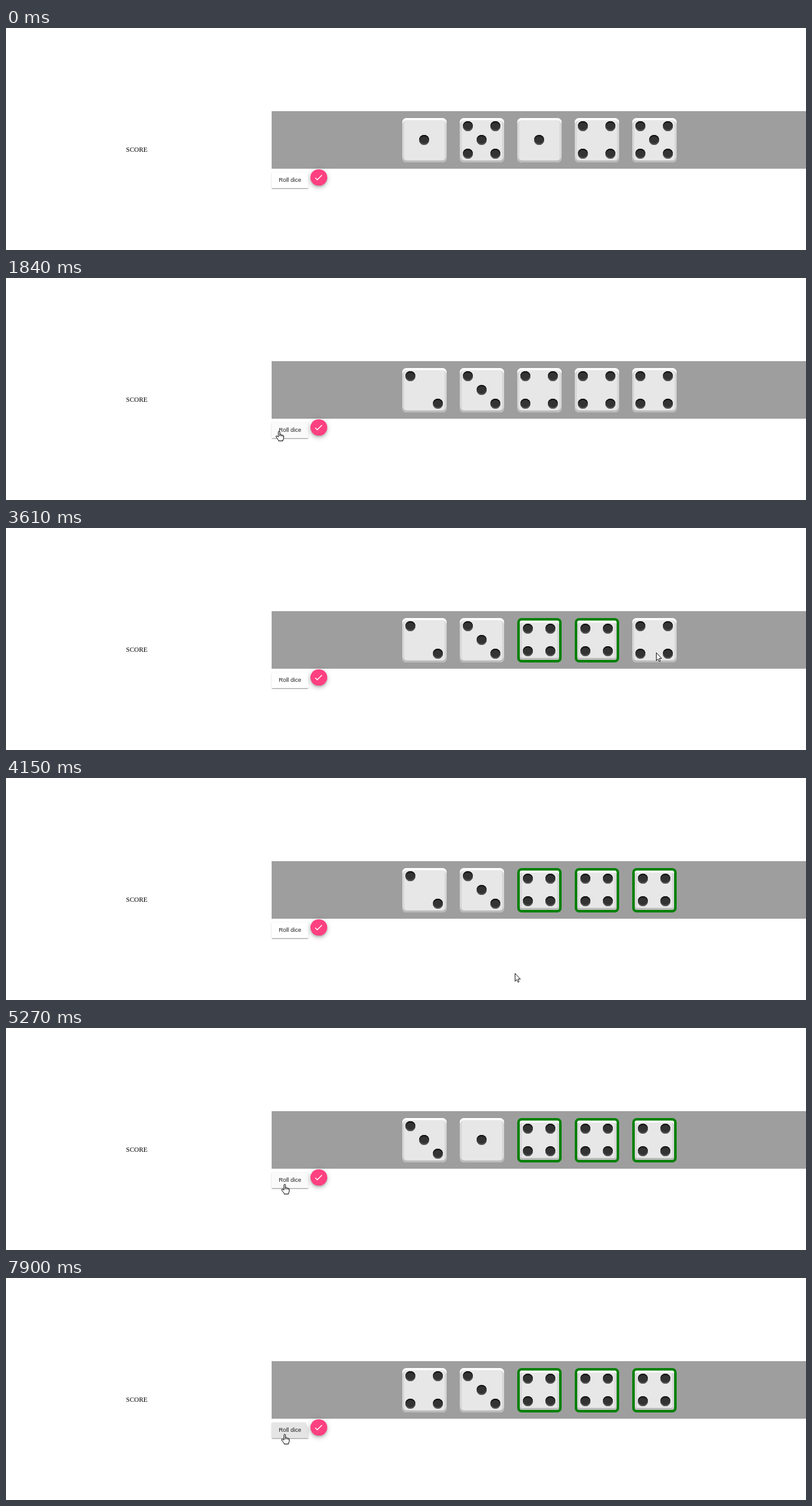
Animation of 1280 by 355 pixels, one loop 8 s. Source, as an HTML page:

```html
<!DOCTYPE html>
<html lang="en">
<head>
<meta charset="utf-8">
<title>Dice</title>
<style>
html, body { margin: 0; width: 100%; height: 100%; overflow: hidden; background: #fff; }
body { position: relative; }
body *, svg { position: absolute; box-sizing: border-box; }
#score { left: 192px; top: 188px; font: 10.67px/13px "Liberation Serif", serif; color: #000; }
#table { left: 425px; top: 133px; right: 0; height: 92px; background: #9e9e9e; }
.die {
  top: 11px; width: 70.67px; height: 70.67px; border-radius: 7px; background: #e7e7e7;
  box-shadow: inset 0 3.33px #fff, inset 0 -3.33px #bbb, inset 3.33px 0 #d7d7d7, inset -3.33px 0 #d7d7d7;
}
.held { border: 4px solid green; }
.pip {
  width: 16px; height: 16px; border-radius: 50%; background: #333;
  box-shadow: inset 0 2px #111, inset 0 -2px #555;
}
#roll, #fab { box-shadow: 0 2px .7px -1.3px #0003, 0 1.3px 1.3px #00000024, 0 .7px 3.3px #0000001f; }
#roll { left: 425px; top: 231px; width: 59px; height: 24.5px; border-radius: 1.3px; overflow: hidden; }
#roll span {
  width: 100%; text-align: center; color: rgba(0, 0, 0, .87);
  font: 9.33px/24px "Liberation Sans", Arial, sans-serif; white-space: nowrap;
}
#ripple { border-radius: 50%; background: rgba(0, 0, 0, .1); }
#fab {
  left: 487px; top: 225.5px; width: 26.67px; height: 26.67px; border-radius: 50%; background: #ff4081;
  box-shadow: 0 2px 3.3px -.7px #0003, 0 4px 6.7px #00000024, 0 .7px 12px #0000001f;
}
#fab svg { left: 5.33px; top: 5.33px; width: 16px; height: 16px; fill: #fff; }
#cursor { left: 0; top: 0; overflow: visible; fill: #fff; stroke: #000; stroke-linejoin: round; }
</style>
</head>
<body>
<div id="score">SCORE</div>
<div id="table"></div>
<div id="roll"><div id="ripple"></div><span>Roll dice</span></div>
<div id="fab"><svg viewBox="0 0 24 24"><path d="M9 16.17L4.83 12l-1.42 1.41L9 19 21 7l-1.41-1.41z"/></svg></div>
<svg id="cursor" width="1" height="1">
  <path id="arrow" stroke-width=".9" d="M.5 .5V13L3.3 10.4 5.2 14.6 7 13.8 5.2 9.6H9Z"/>
  <path id="hand" d="M-1.2 9V1.2Q-1.2 0 0 0T1.2 1.2V6Q1.5 5 2.4 5T3.6 6.4Q4 5.6 4.8 5.8T5.8 7Q6.8 6.4 7.2 7.6V11Q7 13 6 14V15.5H-1V14.3Q-2.5 13-3.2 11.5L-5 8.8Q-5 7.2-3.4 7.6L-1.2 9.4M1.2 6V8M3.6 6.4V8.2M5.8 7V8.4"/>
</svg>
<script>
const LOOP = 8000;
const $ = id => document.getElementById(id);
const FACES = [[], [4], [0, 8], [0, 4, 8], [0, 2, 6, 8], [0, 2, 4, 6, 8]];
const ROLLS = [[0, "15145"], [1285, "23444"], [4710, "31444"], [7785, "43444"]];
const HOLDS = [Infinity, Infinity, 2930, 3270, 3730];

// Pointer strokes: first and last step time, step count, then start, control and end point.
const MOVES = [
  [190, 730, 6, 820, 310, 600, 272, 437, 245],
  [2170, 2710, 6, 437, 245, 640, 215, 842, 197],
  [2930, 2930, 1, 842, 197, 860, 198, 884, 198],
  [3050, 3270, 3, 884, 198, 915, 199, 945, 199],
  [3390, 3610, 3, 945, 199, 990, 199, 1040, 199],
  [3830, 4490, 7, 1040, 199, 760, 420, 446, 250]
];

// Button presses: first visible step, age at that step, end of the ripple, end of the faint rest.
const PRESSES = [[1180, 20, 1840, 2170], [4710, 90, 5270, 7680], [7680, 45, LOOP, LOOP]];
const STEP = 105, GROW = 450;

const dice = HOLDS.map((_, i) => {
  const die = document.createElement("div");
  die.style.left = 209 + 92 * i + "px";
  const pips = Array.from({ length: 9 }, () => {
    const pip = document.createElement("div");
    pip.className = "pip";
    die.append(pip);
    return pip;
  });
  $("table").append(die);
  return { die, pips };
});

const latest = (list, t) => list.filter(item => item[0] <= t).pop();

function drawDice(t) {
  const values = latest(ROLLS, t)[1];
  dice.forEach(({ die, pips }, i) => {
    const held = t >= HOLDS[i], gap = held ? 18 : 22;
    die.className = held ? "die held" : "die";
    pips.forEach((pip, k) => {
      pip.style.left = 5.33 + gap * (k % 3) + "px";
      pip.style.top = 5.33 + gap * Math.floor(k / 3) + "px";
      pip.hidden = !FACES[values[i]].includes(k);
    });
  });
}

function pointerAt(t) {
  const move = latest(MOVES, t);
  if (!move) return null;
  const [start, end, steps, x0, y0, x1, y1, x2, y2] = move;
  const done = end > start ? Math.floor((t - start) / (end - start) * (steps - 1) + 1e-6) + 1 : 1;
  const u = Math.min(1, done / steps), e = u * u * (3 - 2 * u), f = 1 - e;
  const curve = (a, b, c) => f * f * a + 2 * e * f * b + e * e * c;
  return { x: curve(x0, x1, x2), y: curve(y0, y1, y2) };
}

function drawPointer(p) {
  $("cursor").style.display = p ? "" : "none";
  if (!p) return;
  const over = p.x > 425 && p.x < 484 && p.y > 231 && p.y < 256;
  $("hand").style.display = over ? "" : "none";
  $("arrow").style.display = over ? "none" : "";
  $("cursor").style.transform = `translate(${Math.round(p.x)}px, ${Math.round(p.y)}px)`;
}

function drawButton(t, p) {
  const press = latest(PRESSES, t), ripple = $("ripple");
  const active = press && t < press[2];
  $("roll").style.background = press && !active && t < press[3] ? "#fafafa" : "#fff";
  ripple.hidden = !active;
  if (!active) return;
  const age = press[1] + STEP * Math.floor((t - press[0]) / STEP);
  const x = p.x - 425, y = p.y - 230.5;
  const full = Math.hypot(Math.max(x, 59 - x), Math.max(y, 24 - y));
  const r = full * (1 - (1 - Math.min(1, age / GROW)) ** 2.8);
  ripple.style.left = x - r + "px";
  ripple.style.top = y - r + "px";
  ripple.style.width = ripple.style.height = 2 * r + "px";
}

function draw(now) {
  const t = now % LOOP, p = pointerAt(t);
  drawDice(t);
  drawButton(t, p);
  drawPointer(p);
}

const began = performance.now();
function tick() {
  draw(performance.now() - began);
  requestAnimationFrame(tick);
}
tick();
</script>
</body>
</html>
```
